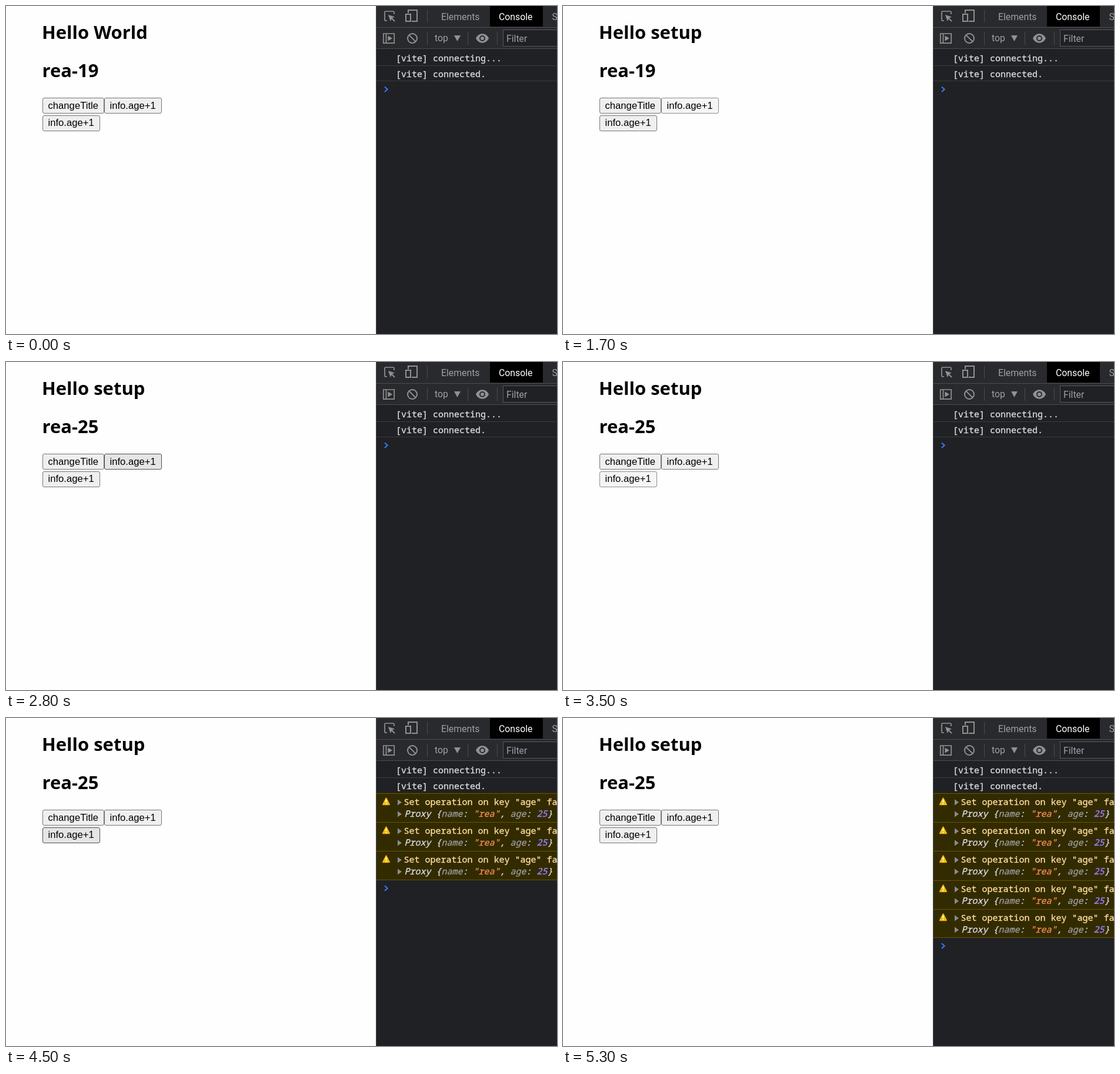
These frames come from a looping animation (937x558 px, 6000 ms). An HTML page:

```html
<!DOCTYPE html>
<html lang="en">
<head>
<meta charset="utf-8">
<title>Reactive state demo</title>
<style>
html, body { margin: 0; width: 100%; height: 100%; overflow: hidden; background: #fefefe; }
svg { display: block; width: 100%; height: 100%; }
text { white-space: pre; }
.head { font: bold 31px "Open Sans", "Noto Sans", sans-serif; fill: #000; }
.btn { font: 16.67px "Liberation Sans", Arial, sans-serif; fill: #000; }
.ui { font: 15.8px Roboto, "Open Sans", sans-serif; fill: #9aa0a6; }
.log {
  font: 15px "Noto Sans Mono", "DejaVu Sans Mono", monospace;
  color: #dcdcdc; fill: currentColor; stroke: currentColor; stroke-width: .35px;
}
.log.warn { color: #ffdd9e; }
.log.obj { font-style: italic; }
.key { color: #9b9b9b; }
.str { color: #f28b54; }
.num { color: #9980ff; }
.line { stroke: #494c50; }
.icon { fill: none; stroke: #919191; stroke-width: 2; }
.solid { fill: #919191; }
</style>
</head>
<body>
<svg viewBox="0 0 937 558">
  <defs>
    <g id="warning">
      <rect x="630" y="-1" width="307" height="50" fill="#332b00"/>
      <path d="M630 .5H937" stroke="#665500"/>
      <path d="M646.5 8.5L652 19.2H641Z" fill="#f4bd00" stroke="#f4bd00" stroke-width="2" stroke-linejoin="round"/>
      <path d="M646.5 11V15.6M646.5 17V18.8" stroke="#fff" stroke-width="1.8"/>
      <path d="M666 10.5L673 15.5L666 20.5ZM666 30.5L673 35.5L666 40.5Z" fill="#8c8c8c"/>
      <text class="log warn" x="676.5" y="20">Set operation on key "age" failed</text>
      <text class="log obj" x="677.5" y="40">Proxy {<tspan class="key">name</tspan>: <tspan class="str">"rea"</tspan>, <tspan class="key">age</tspan>: <tspan class="num">25</tspan>}</text>
    </g>
  </defs>

  <rect width="937" height="558" fill="#fefefe"/>
  <text id="title" class="head" x="61" y="56"></text>
  <text id="info" class="head" x="61.5" y="121"></text>
  <g id="buttons"></g>

  <rect x="629" width="308" height="558" fill="#202124"/>
  <rect x="629" width="308" height="73" fill="#292a2d"/>
  <rect x="823" width="90" height="35" fill="#000"/>
  <path class="line" d="M629.5 0V558M629 36.5H937M629 72.5H937M716.5 7V28M716.5 44V66M785.5 44V66M835.5 44V66"/>
  <path d="M630 101.5H937" stroke="#3a3b3e"/>

  <g class="icon">
    <path d="M648 25H646Q644 25 644 23V11Q644 9 646 9H658Q660 9 660 11V14" stroke-width="1.7"/>
    <path d="M654 19L661 26"/>
    <path d="M684 12V7H699V26H690"/>
    <rect x="680" y="14" width="8" height="12"/>
    <path d="M641.8 47H660.2V63.2H641.8ZM646.5 47V63" stroke-width="1.7"/>
    <circle cx="691" cy="55" r="8"/>
    <path d="M685.4 49.4L696.6 60.6"/>
  </g>
  <g class="solid">
    <path d="M650 15L661 18.6L656.3 20.8L653.8 26Z"/>
    <path d="M649.5 50.5L657 55L649.5 59.5Z"/>
    <path d="M762 50H773L767.5 60Z"/>
    <path d="M799 55C803.5 44.8 816.5 44.8 821 55C816.5 65.2 803.5 65.2 799 55Z"/>
  </g>
  <circle cx="810" cy="55" r="4" fill="#919191" stroke="#292a2d" stroke-width="2"/>
  <rect x="845.5" y="40.5" width="100" height="28" fill="#202124" stroke="#55585c"/>
  <text class="ui" x="740" y="24">Elements</text>
  <text class="ui" x="838" y="24" style="fill:#fff">Console</text>
  <text class="ui" x="928.5" y="24">Sources</text>
  <text class="ui" x="729" y="60">top</text>
  <text class="ui" x="851" y="61">Filter</text>
  <text class="log" x="663" y="94">[vite] connecting...</text>
  <text class="log" x="663" y="121">[vite] connected.</text>
  <g id="warnings"></g>
  <g id="prompt">
    <path id="rule" d="M630 -.5H937"/>
    <path d="M644 9.5L648.7 13.7L644 18" fill="none" stroke="#367cf1" stroke-width="2"/>
  </g>
</svg>
<script>
const LOOP = 6000;
const NS = "http://www.w3.org/2000/svg";
const $ = id => document.getElementById(id);

// Log rows have a fractional height and snap to whole pixels
const rowTop = i => Math.floor(128.25 + i * 49.25);

function add(parent, tag, attrs, text = "") {
  const el = document.createElementNS(NS, tag);
  for (const key in attrs) el.setAttribute(key, attrs[key]);
  el.textContent = text;
  return parent.appendChild(el);
}

function addButton(x, y, w, label) {
  const box = add($("buttons"), "rect", { x: x + .5, y: Math.round(y) + .5, width: w - 1, height: 26, rx: 2.5 });
  add($("buttons"), "text", { class: "btn", x: x + 9.5, y: Math.round(y + 18.5) }, label);
  return box;
}

const buttons = [
  addButton(62, 156, 105, "changeTitle"),
  addButton(167, 156, 98, "info.age+1"),
  addButton(62, 185.6, 98, "info.age+1")
];
const warnings = [0, 1, 2, 3, 4].map(i =>
  add($("warnings"), "use", { href: "#warning", y: rowTop(i) }));

const looks = {
  idle: ["#efefef", "#767676"],
  hover: ["#e5e5e5", "#4f4f4f"],
  active: ["#f5f5f5", "#8d8d8d"]
};

// Pointer position: [start, hovered button]
const hovers = [[0, -1], [700, 0], [1400, 1], [3000, 2], [5200, 1], [5300, -1]];
// Mouse held down: [start, end]
const presses = [[1700, 1800], [2100, 2200], [2300, 2400], [2500, 2600],
  [3500, 3600], [4100, 4200], [4600, 4700], [4800, 4900]];
const ageTimes = [1800, 2000, 2200, 2400, 2600, 2800];
const warnTimes = [3600, 4200, 4500, 4700, 5000];

const countPast = (times, t) => times.filter(at => t >= at).length;

function draw(t) {
  const hovered = hovers.filter(([at]) => t >= at).pop()[1];
  const pressed = presses.some(([from, to]) => t >= from && t < to);
  const count = countPast(warnTimes, t);

  $("title").textContent = t < 1000 ? "Hello World" : "Hello setup";
  $("info").textContent = "rea-" + (19 + countPast(ageTimes, t));
  buttons.forEach((box, i) => {
    const [fill, stroke] = looks[i !== hovered ? "idle" : pressed ? "active" : "hover"];
    box.setAttribute("fill", fill);
    box.setAttribute("stroke", stroke);
  });
  warnings.forEach((row, i) => row.setAttribute("visibility", i < count ? "visible" : "hidden"));
  $("rule").setAttribute("stroke", count ? "#665500" : "#3a3b3e");
  $("prompt").setAttribute("transform", `translate(0 ${rowTop(count)})`);
}

const start = performance.now();
function tick() {
  draw((performance.now() - start) % LOOP);
  requestAnimationFrame(tick);
}
tick();
</script>
</body>
</html>
```
